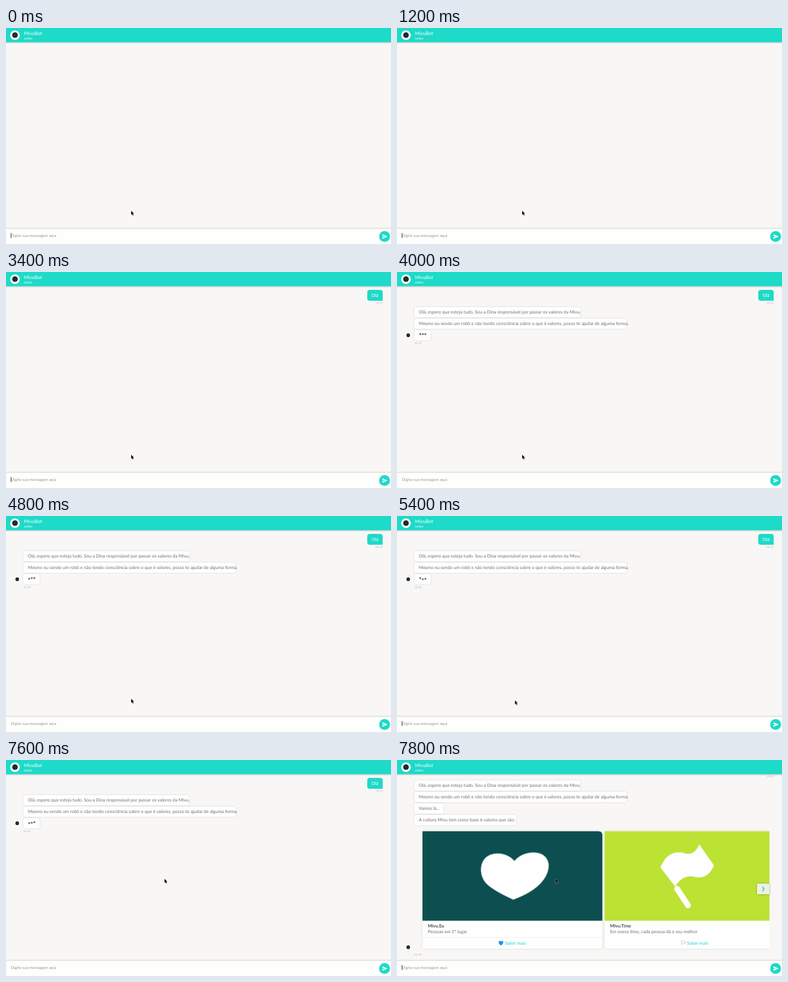
Recreate the animation shown at these times as an HTML page. Size 600x338 px, loop 8000 ms.

```html
<!DOCTYPE html>
<html lang="pt-BR">
<head>
<meta charset="utf-8">
<title>Chat</title>
<style>
html, body { margin: 0; width: 100%; height: 100%; overflow: hidden; background: #f8f7f5; }
svg { display: block; width: 100%; height: 100%; }
text { font: 7px Lato, "Open Sans", sans-serif; fill: #6f6f6f; text-rendering: geometricPrecision; }
.bubble { fill: #fefefe; filter: drop-shadow(0 .3px 1.2px rgba(0,0,0,.16)); }
.stamp { font-size: 4.2px; fill: #b9b9b9; }
.white { fill: #fff; }
.bold { font-weight: 700; fill: #484848; }
.link { fill: #1ed6c5; }
.typed { font-size: 6.2px; fill: #444; }
.hint { font-size: 6.2px; fill: #999; }

.step { animation: 8s step-end infinite; }
#hint { animation-name: hint; }
#t1 { animation-name: t1; }
#t2 { animation-name: t2; }
#t3 { animation-name: t3; }
#caret { animation-name: caret; }
#thread { animation-name: scroll; }
#sent { animation-name: sent; }
#row1 { animation-name: row1; }
#row2 { animation-name: row2; }
#typing { animation-name: typing; }
#answer { animation-name: answer; }
#mouse { animation-name: mouse; }
.dot { fill: #666; animation: bounce 1s step-end infinite; }
.dot:nth-of-type(2) { animation-delay: -.2s; }
.dot:nth-of-type(3) { animation-delay: -.4s; }

@keyframes hint { 0% { opacity: 1 } 22.5% { opacity: 0 } 42.5% { opacity: 1 } }
@keyframes t1 { 0% { opacity: 0 } 22.5% { opacity: 1 } 25% { opacity: 0 } }
@keyframes t2 { 0% { opacity: 0 } 25% { opacity: 1 } 37.5% { opacity: 0 } }
@keyframes t3 { 0% { opacity: 0 } 37.5% { opacity: 1 } 42.5% { opacity: 0 } }
@keyframes caret {
  0%, 10% { opacity: 1; transform: none }
  2.5%, 17.5% { opacity: 0; transform: none }
  22.5% { opacity: 1; transform: translateX(4.9px) }
  25% { opacity: 1; transform: translateX(6.2px) }
  35% { opacity: 0; transform: translateX(6.2px) }
  37.5% { opacity: 1; transform: translateX(9.4px) }
  42.5%, 52.5%, 67.5%, 82.5%, 97.5% { opacity: 1; transform: none }
  45%, 60%, 75%, 90% { opacity: 0; transform: none }
}
@keyframes scroll { 0% { transform: none } 97.5% { transform: translateY(-23px) } }
@keyframes sent { 0% { opacity: 0 } 42.5% { opacity: 1 } }
@keyframes row1 { 0% { opacity: 0 } 47.5% { opacity: 1 } }
@keyframes row2 { 0% { opacity: 0 } 50% { opacity: 1 } }
@keyframes typing {
  0% { opacity: 0; transform: translateY(-36px) }
  45% { opacity: 1; transform: translateY(-36px) }
  47.5% { opacity: 1; transform: translateY(-18px) }
  50% { opacity: 1; transform: none }
  97.5% { opacity: 0; transform: none }
}
@keyframes answer { 0% { opacity: 0 } 97.5% { opacity: 1 } }
@keyframes bounce {
  0% { transform: none }
  60% { transform: translateY(1.6px) }
  80% { transform: translateY(1.1px) }
}
@keyframes mouse {
  0% { transform: translate(195px, 286px) }
  62.5% { transform: translate(191px, 287px) }
  65% { transform: translate(186px, 288px) }
  67.5% { transform: translate(183.7px, 288.5px) }
  75% { transform: translate(198px, 265px) }
  77.5% { transform: translate(225px, 222px) }
  80% { transform: translate(243px, 192px) }
  82.5% { transform: translate(247px, 186px) }
}
</style>
</head>
<body>
<svg viewBox="0 0 600 338" preserveAspectRatio="none">
  <defs>
    <linearGradient id="shade" x2="0" y2="1">
      <stop stop-color="#000" stop-opacity=".16"/>
      <stop offset="1" stop-color="#000" stop-opacity="0"/>
    </linearGradient>
    <clipPath id="frame"><rect x="27" y="105" width="553.5" height="195"/></clipPath>
    <g id="avatar">
      <circle r="4.7" fill="#fff"/>
      <circle r="2.9" fill="#222c2c"/>
    </g>
  </defs>
  <rect width="600" height="338" fill="#f8f7f5"/>

  <g id="thread" class="step">
    <g id="sent" class="step">
      <path d="M567 28h16q4 0 4 4v13h-20q-4 0-4-4v-9q0-4 4-4z" fill="#1edac8"/>
      <text class="white" x="569.7" y="39">Olá</text>
      <text class="stamp" x="587" y="50.3" text-anchor="end">02:39</text>
    </g>
    <g id="row1" class="step">
      <rect class="bubble" x="27" y="54.7" width="259" height="16.4" rx="4"/>
      <text x="34" y="65.2">Olá, espero que esteja tudo. Sou a Dina responsável por passar os valores da Mivu.</text>
    </g>
    <g id="row2" class="step">
      <rect class="bubble" x="27" y="72.7" width="331" height="16.4" rx="4"/>
      <text x="34" y="83.2">Mesmo eu sendo um robô e não tendo consciência sobre o que é valores, posso te ajudar de alguma forma.</text>
    </g>
    <g id="typing" class="step">
      <use href="#avatar" x="17.5" y="99"/>
      <rect class="bubble" x="27" y="90.7" width="25.7" height="16.2" rx="4"/>
      <g>
        <circle class="dot" cx="36.2" cy="97.2" r="1.4"/>
        <circle class="dot" cx="40.2" cy="97.2" r="1.4"/>
        <circle class="dot" cx="44.2" cy="97.2" r="1.4"/>
      </g>
      <text class="stamp" x="27.5" y="112.7">02:39</text>
    </g>
  </g>

  <g id="answer" class="step">
    <rect class="bubble" x="27" y="67.7" width="45.7" height="16.4" rx="4"/>
    <text x="34" y="78.2">Vamos lá...</text>
    <rect class="bubble" x="27" y="85.7" width="159" height="16.4" rx="4"/>
    <text x="34" y="96.2">A cultura Mivu tem como base 6 valores que são:</text>

    <g clip-path="url(#frame)">
      <path class="bubble" d="M39.7 111.5H314q6 0 6 6V291q0 4.5-4.5 4.5H44q-4.3 0-4.3-4.5z"/>
      <path d="M39.7 111.5H314q6 0 6 6V251.5H39.7z" fill="#0d4f50"/>
      <path d="M183 158C172 145 150 142 138 153C127 164 129 185 142 196C154 206 168 212 181 218.5C196 213 216 204 228 188C240 172 240 152 222 146C206 142 190 149 183 158z" fill="#fefefe" stroke="#8fb0b0" stroke-width=".8"/>
      <text class="bold" x="48" y="262.2">Mivu.Eu</text>
      <text x="48" y="270.5">Pessoas em 1º lugar</text>
      <path d="M40 277.5H320M324 277.5H581" stroke="#ededed" stroke-width=".8"/>
      <path d="M162 290.2C159 288 158 286.6 158.4 285C159 282.5 161.4 282.7 162 284.4C162.6 282.7 165 282.5 165.6 285C166 286.6 165 288 162 290.2z" fill="#2496dc"/>
      <text class="link" x="168" y="288.6">Saber mais</text>

      <rect class="bubble" x="323.7" y="111.5" width="280" height="184" rx="4"/>
      <rect x="323.7" y="111.5" width="280" height="140" fill="#bce233"/>
      <path d="M410.5 168C418 149 432 140 450 146.5C460 149 468 141 471 132L494 165C488 179 478 187 462 182.5C450 180 440 187 433.5 198z" fill="#fefefe" stroke="#dcefa0" stroke-width=".8"/>
      <path d="M436.5 201.5L453.5 227.5" stroke="#fefefe" stroke-width="9" stroke-linecap="round"/>
      <text class="bold" x="332" y="262.2">Mivu.Time</text>
      <text x="332" y="270.5">Em nosso time, cada pessoa dá o seu melhor</text>
      <path d="M442.7 283L444.2 290.3M443 283.4q2-1 3.4 0t3 0l.6 3.5q-1.6.9-3 0t-3.2 0" fill="#fff" stroke="#b4b4b4" stroke-width=".6"/>
      <text class="link" x="452" y="288.6">Saber mais</text>
    </g>

    <rect x="561" y="193.3" width="19.5" height="16.7" fill="#eff0e2" style="filter: drop-shadow(0 .5px 1.5px rgba(0,0,0,.3))"/>
    <path d="M569.5 198.4l2.6 3.4-2.6 3.4" fill="none" stroke="#1ed6c5" stroke-width="1.6"/>
    <use href="#avatar" x="17.5" y="293"/>
    <text class="stamp" x="27.5" y="305.8">02:39</text>
  </g>

  <rect y="22" width="600" height="3" fill="url(#shade)"/>
  <rect width="600" height="22.3" fill="#1edac8"/>
  <circle cx="14" cy="11.2" r="7.5" fill="#fff"/>
  <circle cx="14" cy="11.2" r="4.4" fill="#222c2c"/>
  <text class="white" x="28" y="10.6" style="font-size: 7.5px">MivuBot</text>
  <text class="white" x="28" y="17.6" style="font-size: 4.9px">online</text>

  <rect y="-314.5" width="600" height="2.5" fill="url(#shade)" transform="scale(1 -1)"/>
  <rect y="314.3" width="600" height="24" fill="#fefefd"/>
  <text id="hint" class="hint step" x="7.7" y="327">Digite sua mensagem aqui</text>
  <text id="t1" class="typed step" x="7.7" y="327">O</text>
  <text id="t2" class="typed step" x="7.7" y="327">Ol</text>
  <text id="t3" class="typed step" x="7.7" y="327">Olá</text>
  <rect id="caret" class="step" x="7.5" y="320.8" width=".8" height="8" fill="#222"/>
  <circle cx="590" cy="326.3" r="8.5" fill="#1edac8"/>
  <path d="M586.7 322.8l8 3.5-8 3.5v-2.7l5.2-.8-5.2-.8z" fill="#fff"/>

  <path id="mouse" class="step" d="M0 0V6.3L1.5 5L2.6 7.4L3.7 6.9L2.7 4.6H4.6z" fill="#111" stroke="#fff" stroke-width=".5" paint-order="stroke"/>
</svg>
</body>
</html>
```
